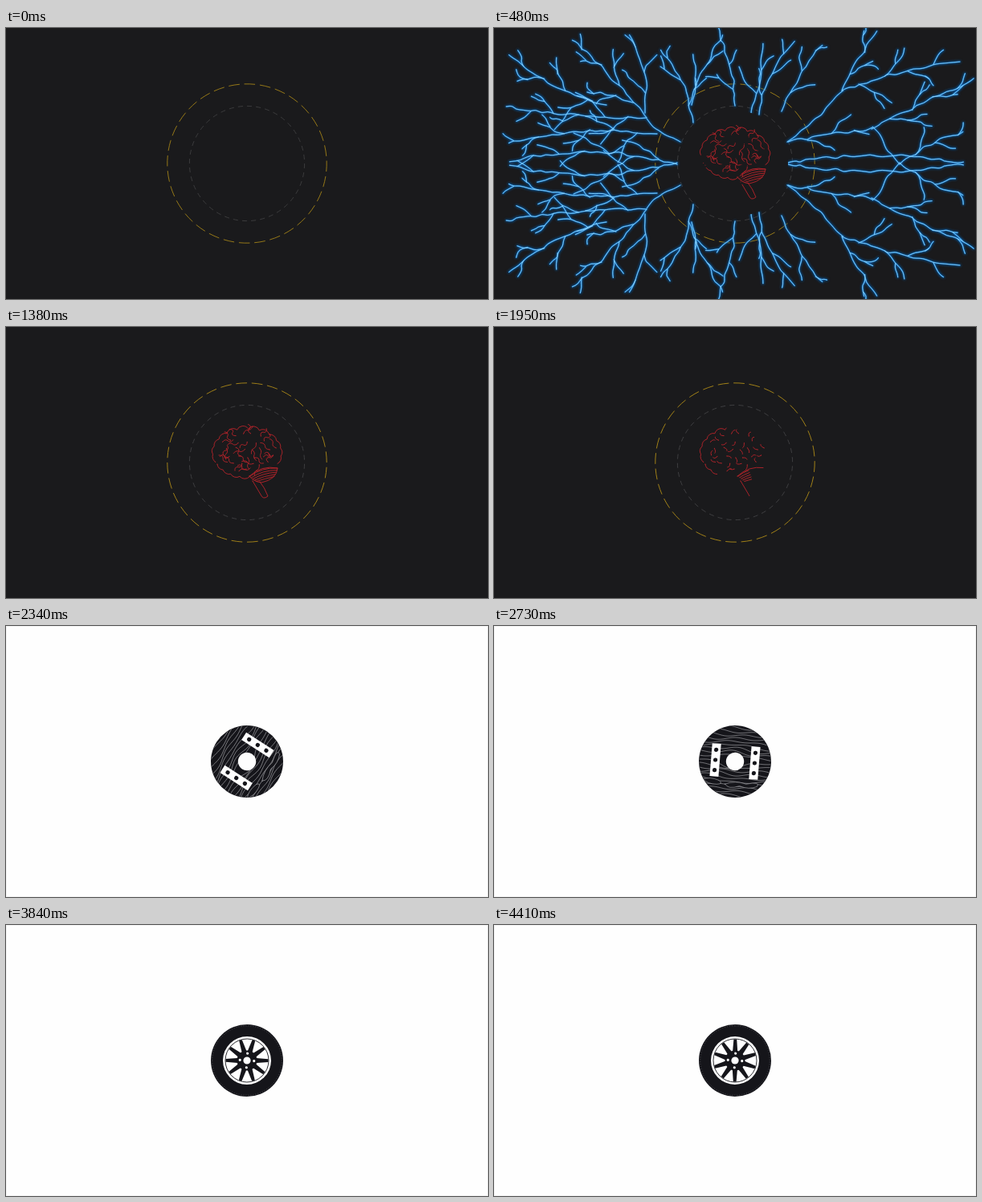
Recreate the animation shown at these times as an HTML page. Size 600 by 338 pixels, loop 4440 ms.

```html
<!DOCTYPE html>
<html lang="en">
<head>
<meta charset="utf-8">
<title>Ideas</title>
<style>
  html, body { margin: 0; width: 100%; height: 100%; overflow: hidden; background: #1a1a1c; }
  svg { display: block; width: 600px; height: 338px; }
  .line { fill: none; stroke-linecap: round; stroke-linejoin: round; }
</style>
</head>
<body>
<svg viewBox="0 0 600 338">
  <defs>
    <filter id="blur" x="0" y="0" width="600" height="338" filterUnits="userSpaceOnUse">
      <feGaussianBlur stdDeviation="1.8"/>
    </filter>
    <mask id="pulse" maskUnits="userSpaceOnUse" x="0" y="0" width="600" height="338">
      <circle id="band" cx="300" cy="169" fill="none" stroke="#fff"/>
    </mask>
    <clipPath id="disc"><circle r="44.5"/></clipPath>
    <path id="half"/>
    <g id="tree">
      <use href="#half"/>
      <use href="#half" transform="matrix(1 0 0 -1 0 338)"/>
    </g>
  </defs>

  <g id="mind">
    <rect width="600" height="338" fill="#1a1a1c"/>
    <g fill="none">
      <circle id="outer" cx="300" cy="169" r="99.2" stroke="#a98718" stroke-width=".85" pathLength="640" stroke-dasharray="14 6"/>
      <circle id="inner" cx="300" cy="169" r="71.6" stroke="#434345" stroke-width=".8" pathLength="440" stroke-dasharray="6 5"/>
    </g>
    <g class="line" id="bolts" mask="url(#pulse)">
      <use href="#tree" stroke="#0a5aa6" stroke-width="2.6" filter="url(#blur)"/>
      <use href="#tree" stroke="#1b86d8" stroke-width="1.4"/>
      <use href="#tree" stroke="#a0dfff" stroke-width=".7"/>
    </g>
    <g class="line" id="brain" stroke="#b8242b" stroke-width=".9"></g>
  </g>

  <g id="wheels">
    <rect width="600" height="338" fill="#fefefe"/>
    <rect x=".5" y=".5" width="599" height="337" fill="none" stroke="#f3f3f3"/>
    <g id="spin" fill="#15151a"></g>
  </g>
</svg>
<script>
const $ = id => document.getElementById(id);
const LOOP = 4440;

let seed = 11;
const random = () => (seed = seed * 16807 % 2147483647) / 2147483647;
const jitter = size => (random() - 0.5) * 2 * size;
const repeat = (n, draw) => Array.from({ length: n }, (_, i) => draw(i)).join('');

function smooth(points) {
  let d = 'M' + points[0];
  for (let i = 1; i < points.length - 1; i++) {
    const [x, y] = points[i], [nx, ny] = points[i + 1];
    d += `Q${x},${y} ${(x + nx) / 2},${(y + ny) / 2}`;
  }
  return d + 'L' + points.at(-1);
}

// A swaying line to the tip that forks to alternate sides on its way.
function limb(x, y, tipX, tipY, depth) {
  const dx = tipX - x, dy = tipY - y, reach = Math.hypot(dx, dy);
  const steps = Math.max(2, Math.ceil(reach / 8));
  const bend = jitter(0.09);
  const points = [[x, y]];
  let side = random() < 0.5 ? -1 : 1, forks = '';
  for (let k = 1; k <= steps; k++) {
    const f = k / steps, sway = bend * Math.sin(Math.PI * f);
    const px = x + dx * f - dy * sway + jitter(2.2);
    const py = y + dy * f + dx * sway + jitter(2.2);
    points.push([px, py]);
    if (depth && k % 4 === 3 && k < steps) {
      const angle = Math.atan2(dy, dx) + side * (0.4 + random() * 0.4);
      const size = 14 + Math.min(45, reach * (1 - f) * 0.4) * (0.5 + random() * 0.5);
      forks += limb(px, py, px + Math.cos(angle) * size, py + Math.sin(angle) * size, depth - 1);
      side = -side;
    }
  }
  return smooth(points) + forks;
}

// Root and tip of each limb in the upper half; the lower half is its reflection.
const limbs = [
  [232, 142, 190, 112, 0], [190, 112, 14, 98, 2], [190, 112, 98, 14, 2], [140, 96, 18, 32, 2],
  [188, 106, 170, 10, 1], [203, 132, 18, 144, 2], [228, 170, 18, 166, 1],
  [248, 118, 207, 27, 2], [246, 96, 285, 10, 1], [300, 97, 283, 16, 2],
  [320, 106, 333, 20, 1], [330, 108, 372, 18, 1], [358, 104, 407, 22, 1],
  [365, 142, 433, 78, 0], [433, 78, 476, 2, 2], [433, 78, 578, 42, 2],
  [366, 142, 470, 126, 1], [470, 126, 598, 65, 2],
  [366, 170, 585, 170, 0], [505, 170, 470, 122, 0], [505, 170, 585, 130, 1]
];
$('half').setAttribute('d', limbs.map(l => limb(...l)).join(''));

// Lobed edges: arcs bulging outwards between points spread round an ellipse.
function lobes(from, to, count, rx, ry, sweep) {
  let d = '';
  for (let i = 0; i <= count; i++) {
    const a = from + (to - from) * i / count;
    d += `${i ? `A8 8 0 0 ${sweep} ` : 'M'}${300 + rx * Math.cos(a)} ${157 + ry * Math.sin(a)}`;
  }
  return d;
}

// A short curling walk.
function fold(x, y) {
  const points = [[x, y]], twist = 0.5 + random() * 0.7;
  let angle = random() * Math.PI * 2;
  for (let k = 0; k < 5; k++) {
    x += Math.cos(angle) * 3.4;
    y += Math.sin(angle) * 3.1;
    angle += twist * (k < 2 ? 1 : -1);
    points.push([x, y]);
  }
  return smooth(points);
}

const paths = [
  lobes(2.75, 6.75, 12, 42.5, 30, 1),
  lobes(2.65, 1.5, 4, 42, 30, 0),
  'M307 192L317 209Q320 216 326 211Q322 200 316 193',
  'M303 186Q318 172 338 176Q337 190 318 194Q308 193 303 186'
];
for (let i = 0; i < 5; i++) {
  paths.push(`M${304 + i * 2} ${186 + i * 1.6}Q${318 + i} ${175 + i * 3.6} ${338 - i} ${176 + i * 2.6}`);
}
for (let row = 0; row < 6; row++) {
  for (let column = 0; column < 8; column++) {
    const x = 264 + column * 10.5 + (row % 2) * 5 + jitter(2), y = 134 + row * 9 + jitter(2);
    if (Math.hypot((x - 300) / 38, (y - 156) / 26) < 1 && y < 188 - (x - 260) * 0.23) paths.push(fold(x, y));
  }
}
$('brain').innerHTML = paths.map(d => `<path pathLength="100" d="${d}"/>`).join('');
const strokes = [...$('brain').children];

function grain(i) {
  const base = -42 + i * 4.7;
  const points = [];
  for (let x = -46; x <= 46; x += 4) {
    const swell = Math.sign(base) * 8 * Math.exp(-(x * x) / 330 - Math.abs(base) / 14);
    points.push([x, base + swell + 1.3 * Math.sin(x / 7 + i * 1.7) + Math.sin(x / 15 + i)]);
  }
  return `<path d="${smooth(points)}"/>`;
}

const batten = x => `<g transform="translate(${x})"><rect x="-5.5" y="-20.5" width="11" height="41" fill="#fefefe"/>
  ${repeat(3, i => `<circle cy="${i * 12.7 - 12.7}" r="2.6"/>`)}</g>`;

const wooden = `<g><circle r="45"/>
  <g class="line" stroke="#c9c9cc" stroke-width=".5" clip-path="url(#disc)">${repeat(19, grain)}
    <path fill="#15151a" d="M-38 25Q-30 21-18 25Q-12 29-20 30Q-32 31-38 25ZM-10 29Q2 23 16 27Q34 22 30 29Q20 34 8 30Q-6 36-10 29Z"/></g>
  ${batten(-24.5)}${batten(24.5)}<circle r="11.2" fill="#fefefe"/></g>`;

const spoked = `<g stroke="#15151a" fill="none"><circle r="40.8" stroke-width="8.4"/>
  <circle r="6.2" stroke-width="2.8"/>
  ${repeat(8, i => `<path stroke-width="3" d="M7 0H38" transform="rotate(${i * 45 + 22.5})"/>`)}</g>`;

const tyre = `<g><circle r="45"/>
  <circle r="43.3" fill="none" stroke="#55555c" stroke-width=".8" stroke-dasharray="1 2"/>
  <circle r="30" fill="#fefefe"/><circle r="27" fill="none" stroke="#15151a" stroke-width=".9"/><circle r="12.5"/>
  ${repeat(10, i => `<path d="M9-3.2L26.5-1.9V1.9L9 3.2Z" transform="rotate(${i * 36})"/>`)}
  <g fill="#fefefe"><circle r="4.6"/>${repeat(4, i => `<circle cx="8.8" r="1.6" transform="rotate(${i * 90 + 4})"/>`)}</g></g>`;

$('spin').innerHTML = wooden + spoked + tyre;
const wheels = [...$('spin').children];

const span = (t, from, to) => Math.min(1, Math.max(0, (t - from) / (to - from)));
const ease = p => p * p * (3 - 2 * p);
const show = (node, on) => node.setAttribute('display', on ? 'inline' : 'none');

function render(t) {
  const rolling = t >= 2340;
  show($('mind'), !rolling);
  show($('wheels'), rolling);

  if (rolling) {
    const current = t < 3000 ? 0 : t < 3720 ? 1 : 2;
    wheels.forEach((wheel, i) => show(wheel, i === current));
    const angle = 4.5 + (t - 2730) * 85.5 / 540;
    $('spin').setAttribute('transform', `translate(300 169) rotate(${angle})`);
    return;
  }

  $('outer').setAttribute('transform', `rotate(${t * 0.012 - 2} 300 169)`);
  $('inner').setAttribute('transform', `rotate(${-t * 0.012} 300 169)`);

  const head = 66 + 290 * ease(span(t, 30, 470));
  const tail = 66 + 290 * ease(span(t, 570, 1080));
  show($('bolts'), head > tail);
  $('band').setAttribute('r', (head + tail) / 2);
  $('band').setAttribute('stroke-width', head - tail);

  // Strokes appear from their far end and vanish back towards their start.
  const start = 100 * (1 - ease(span(t, 30, 570)));
  const end = 100 * (1 - ease(span(t, 1650, 2190)));
  show($('brain'), end - start > 0.1);
  for (const path of strokes) path.setAttribute('stroke-dasharray', `0 ${start} ${end - start} 200`);
}

function frame() {
  render(performance.now() % LOOP);
  requestAnimationFrame(frame);
}
frame();
</script>
</body>
</html>
```
